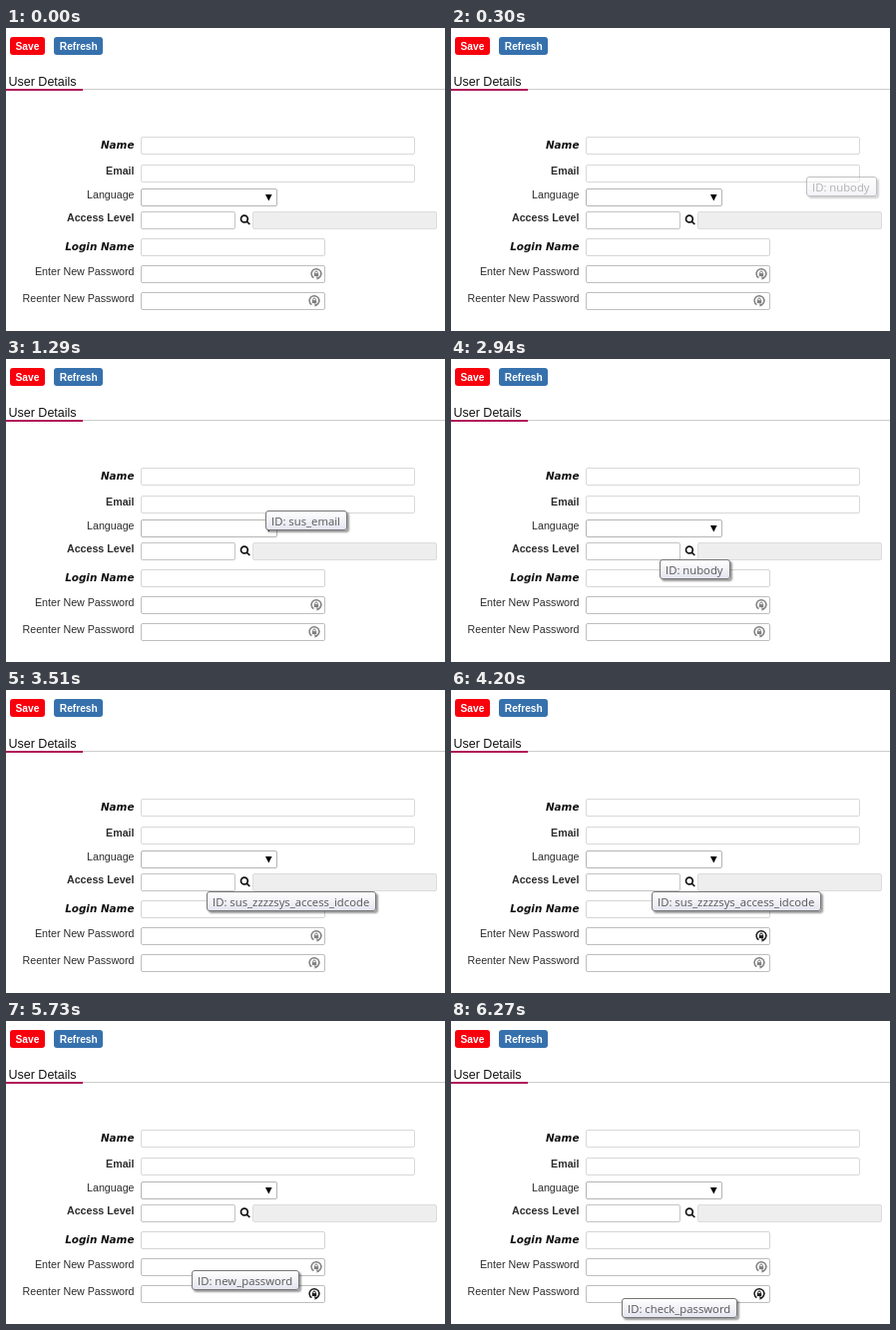
Animation of 440x304 px, one loop 7110 ms. Source, as an HTML page:

```html
<!DOCTYPE html>
<html lang="en">
<head>
<meta charset="utf-8">
<title>User Details</title>
<style>
  html, body { margin: 0; width: 100%; height: 100%; overflow: hidden; background: #fff; }
  #form { position: absolute; left: 0; top: 0; }
  text { font: 10.67px "Liberation Sans", Arial, sans-serif; fill: #2c2c2c; }
  .title { font-size: 12.5px; fill: #111; }
  .button { font-size: 10.2px; font-weight: bold; fill: #fff; }
  .label { text-anchor: end; }
  .bold { font-weight: bold; }
  .must { font: italic bold 10.4px "DejaVu Sans", sans-serif; fill: #111; }
  #tip {
    position: absolute; box-sizing: border-box; height: 20px; padding: 0 6px 0 5px;
    border: 1px solid #767676; border-radius: 3px;
    background: linear-gradient(#fff, #e4e5f0);
    box-shadow: 2px 2px 2px rgba(0, 0, 0, .4);
    font: 11.3px/19px "Open Sans", "Noto Sans", sans-serif;
    color: #575757; white-space: nowrap;
  }
</style>
</head>
<body>
<svg id="form" width="440" height="304" viewBox="0 0 440 304"></svg>
<div id="tip"></div>
<script>
const LOOP = 7110;
const form = document.getElementById('form');
const tip = document.getElementById('tip');

function add(tag, attrs, parent = form) {
  const el = document.createElementNS('http://www.w3.org/2000/svg', tag);
  for (const key in attrs) el.setAttribute(key, attrs[key]);
  return parent.appendChild(el);
}

function write(text, x, y, cls) {
  add('text', { x, y, class: cls }).textContent = text;
}

function button(text, x, width, fill, textX) {
  add('rect', { x, y: 9, width, height: 18, rx: 3, fill });
  write(text, textX, 22, 'button');
}

function field(x, y, width, stroke, fill = '#fff') {
  add('rect', { x: x + .5, y: y + .5, width: width - 1, height: 17, rx: 1.5, fill, stroke });
}

// Lock inside a ring that is open at the bottom
function lockIcon(x, y) {
  const g = add('g', { transform: `translate(${x} ${y})`, fill: 'none', stroke: 'currentColor' });
  add('path', { d: 'M-2.6 4.2A4.9 4.9 0 1 1 2 4.5', 'stroke-width': 1.5 }, g);
  add('path', { d: 'M.2 2.6L3.4 4.3L.6 6.2Z', fill: 'currentColor', stroke: 'none' }, g);
  add('path', { d: 'M-1.3 0V-1.2A1.3 1.3 0 0 1 1.3 -1.2V0', 'stroke-width': 1 }, g);
  add('rect', { x: -2.2, y: -.4, width: 4.4, height: 3, fill: 'currentColor', stroke: 'none' }, g);
  return g;
}

button('Save', 4, 35, '#f8000c', 9.5);
button('Refresh', 48, 49, '#3671ad', 53.8);
write('User Details', 2.5, 58, 'title');
add('rect', { x: 0, y: 61, width: 440, height: 1, fill: '#ccc' });
add('rect', { x: 0, y: 61, width: 77, height: 2, fill: '#b0175a' });

const labels = [
  ['Name', 121, 'must'], ['Email', 147, 'bold'], ['Language', 171, ''],
  ['Access Level', 194, 'bold'], ['Login Name', 223, 'must'],
  ['Enter New Password', 248, ''], ['Reenter New Password', 275, '']
];
for (const [text, y, cls] of labels) write(text, 128.5, y, 'label ' + cls);

field(135, 109, 275, '#d9d9d9');
field(135, 137, 275, '#d9d9d9');
field(135, 161, 137, '#b5b5b5');
field(135, 184, 95, '#c4c4c4');
field(247, 184, 185, '#dcdcdc', '#eee');
field(135, 211, 185, '#d5d5d5');
field(135, 238, 185, '#bebebe');
field(135, 265, 185, '#bebebe');

add('path', { d: 'M260 167H266.6L263.3 173.4Z', fill: '#000' });
add('path', {
  d: 'M242.3 191.5A3.4 3.4 0 1 1 235.5 191.5A3.4 3.4 0 1 1 242.3 191.5M241.3 194L244.3 197',
  fill: 'none', stroke: '#111', 'stroke-width': 1.7
});

// Each icon is dark while the pointer is in its field
const locks = [
  { icon: lockIcon(311, 246.5), from: 4140, to: 5520 },
  { icon: lockIcon(309, 273.5), from: 5730, to: LOOP }
];

// start, fade time, left, top, id
const tips = [
  [180, 330, 356, 149, 'nubody'],
  [1230, 0, 260, 152, 'sus_email'],
  [2940, 0, 209, 201, 'nubody'],
  [3510, 0, 201, 202, 'sus_zzzzsys_access_idcode'],
  [4590, 0, 186, 250, 'new_password'],
  [6180, 0, 171, 278, 'check_password']
];

function draw(t) {
  for (const { icon, from, to } of locks) {
    icon.style.color = t >= from && t < to ? '#1c1c1c' : '#808080';
  }
  const current = tips.filter(([start]) => t >= start).pop();
  if (!current) {
    tip.style.opacity = 0;
    return;
  }
  const [start, fade, left, top, id] = current;
  tip.textContent = 'ID: ' + id;
  tip.style.left = left + 'px';
  tip.style.top = top + 'px';
  tip.style.opacity = fade ? Math.min(1, (t - start + 30) / fade) : 1;
}

const begin = performance.now();
function tick() {
  draw((performance.now() - begin) % LOOP);
  requestAnimationFrame(tick);
}
tick();
</script>
</body>
</html>
```
